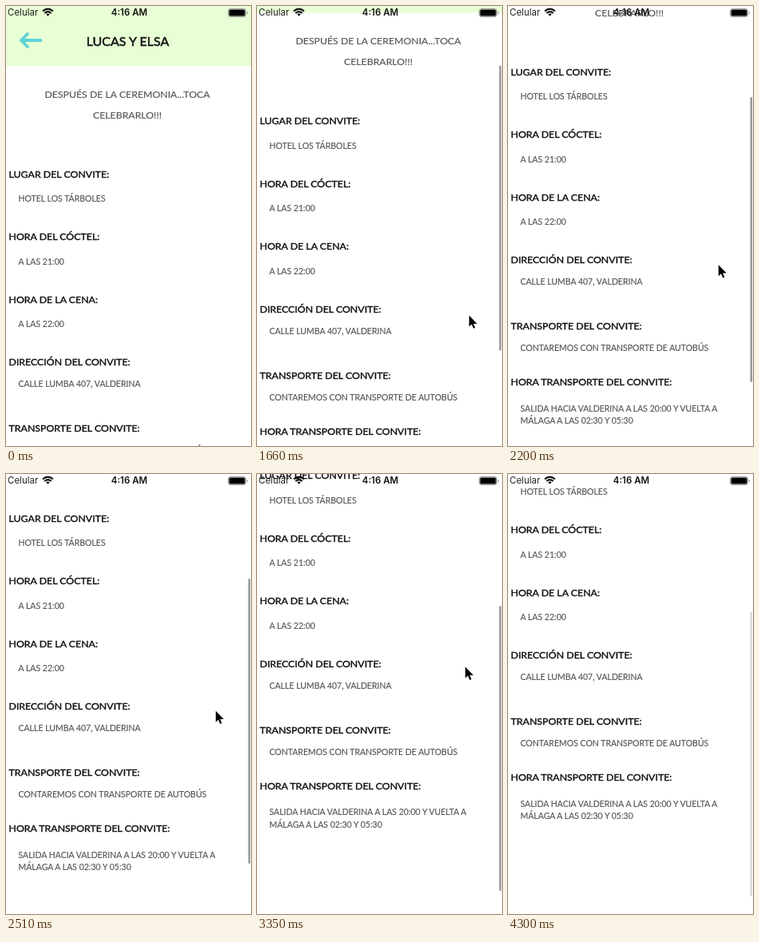
Animation, 307 px wide and 551 px high, one loop 4830 ms. Source, as an HTML page:

```html
<!DOCTYPE html>
<html lang="es">
<head>
<meta charset="utf-8">
<style>
  html, body { margin: 0; width: 100%; height: 100%; overflow: hidden; background: #fff; }
  svg { display: block; width: 100%; height: 100%; }
  text { font-family: Lato, sans-serif; }
  .title { font-size: 16px; fill: #111; stroke: #111; stroke-width: .5; text-anchor: middle; }
  .intro { font-size: 12.3px; fill: #555; stroke: #555; stroke-width: .15; text-anchor: middle; }
  .label { font-size: 12.35px; fill: #111; stroke: #111; stroke-width: .4; }
  .item { font-size: 10.5px; fill: #555; stroke: #555; stroke-width: .15; }
  .status text { font: 11.5px Inter, sans-serif; fill: #222; }
  .status .clock { font-weight: 600; text-anchor: middle; fill: #111; }
</style>
</head>
<body>
<svg viewBox="0 0 307 551">
  <g id="page">
    <rect y="-1" width="307" height="76" fill="#e8fed5"/>
    <path d="M43.500 43H19M27 35l-8 8 8 8" fill="none" stroke="#5dd5d8" stroke-width="3.800" stroke-linecap="round" stroke-linejoin="round"/>
  </g>
  <rect id="bar" x="303.500" width="2.600" height="357" rx="1.300"/>
  <g class="status">
    <text x="2" y="12">Celular</text>
    <g fill="none" stroke="#111" stroke-width="2">
      <path d="M46 6.500Q52.500 .800 59 6.500M48.300 9Q52.500 5.300 56.700 9"/>
      <path d="M50.300 10.300Q52.500 8.600 54.700 10.300L52.500 12.800z" fill="#111" stroke="none"/>
    </g>
    <text class="clock" x="154.500" y="12">4:16 AM</text>
    <rect x="278.500" y="3.500" width="22" height="10" rx="2.500" fill="none" stroke="#999"/>
    <rect x="279.500" y="4.500" width="20" height="8" rx="1.500"/>
    <path d="M302 7q2 1.700 0 3.500z" fill="#777"/>
  </g>
  <path id="cursor" d="M0 0V14l3.200-3 2.300 5.300 2.100-.900-2.200-5H10z" stroke="#fff" stroke-width="2" paint-order="stroke"/>
</svg>
<script>
const LOOP = 4830, START = 350, STEP = 76.9;
const $ = id => document.getElementById(id);

function addText(cls, x, y, str) {
  const el = document.createElementNS('http://www.w3.org/2000/svg', 'text');
  el.setAttribute('class', cls);
  el.setAttribute('x', x);
  el.setAttribute('y', y);
  el.textContent = str;
  $('page').append(el);
}

// Lays out one heading with its lines and moves down by the section height.
let y = 214.6;
function section(height, gap, label, ...lines) {
  addText('label', 3.5, y, label);
  lines.forEach((line, i) => addText('item', 15.5, y + gap + i * 15.5, line));
  y += height;
}

addText('title', 152.5, 50, 'LUCAS Y ELSA');
addText('intro', 152, 114.5, 'DESPUÉS DE LA CEREMONIA...TOCA');
addText('intro', 152, 140.5, 'CELEBRARLO!!!');
section(78.5, 30.5, 'LUGAR DEL CONVITE:', 'HOTEL LOS TÁRBOLES');
section(78.5, 30.5, 'HORA DEL CÓCTEL:', 'A LAS 21:00');
section(78.5, 30.5, 'HORA DE LA CENA:', 'A LAS 22:00');
section(83, 27, 'DIRECCIÓN DEL CONVITE:', 'CALLE LUMBA 407, VALDERINA');
section(70, 27, 'TRANSPORTE DEL CONVITE:', 'CONTAREMOS CON TRANSPORTE DE AUTOBÚS');
section(0, 32.5, 'HORA TRANSPORTE DEL CONVITE:',
  'SALIDA HACIA VALDERINA A LAS 20:00 Y VUELTA A', 'MÁLAGA A LAS 02:30 Y 05:30');

// Progress from 0 to 1 between two steps.
const ramp = (k, from, to) => Math.min(1, Math.max(0, (k - from) / (to - from)));

// The drag slows down in stages.
const scrollAt = k => 66.5 * ramp(k, 12, 17) + 61.5 * ramp(k, 17, 24) +
  60 * ramp(k, 24, 33) + 31 * (1 - (1 - ramp(k, 33, 46)) ** 1.7);

// The pointer comes in from below, drags the page up, then speeds away downwards.
function cursorAt(k, scroll) {
  const left = Math.max(0, k - 41);
  return [
    264 + 4 * ramp(k, 0, 2) - scroll / 30 + 1.2 * left,
    525 - 39 * ramp(k, 0, 2) - 14 * ramp(k, 4, 8) - 16 * ramp(k, 11, 12) -
      scroll * 1.03 + 10 * left + 2.2 * left * left
  ];
}

function draw(now) {
  const k = Math.floor((now % LOOP - START + 6) / STEP);
  const scroll = scrollAt(k);
  $('page').setAttribute('transform', `translate(0 ${-scroll})`);
  $('bar').setAttribute('y', 32 + scroll * .64);
  $('bar').setAttribute('opacity', .4 * ramp(k, 12, 13) - .25 * ramp(k, 41, 46));
  $('cursor').setAttribute('transform', `translate(${cursorAt(k, scroll)})`);
  $('cursor').setAttribute('visibility', k < 0 || k > 50 ? 'hidden' : 'visible');
}

const begin = performance.now();
function frame() {
  draw(performance.now() - begin);
  requestAnimationFrame(frame);
}
frame();
</script>
</body>
</html>
```
